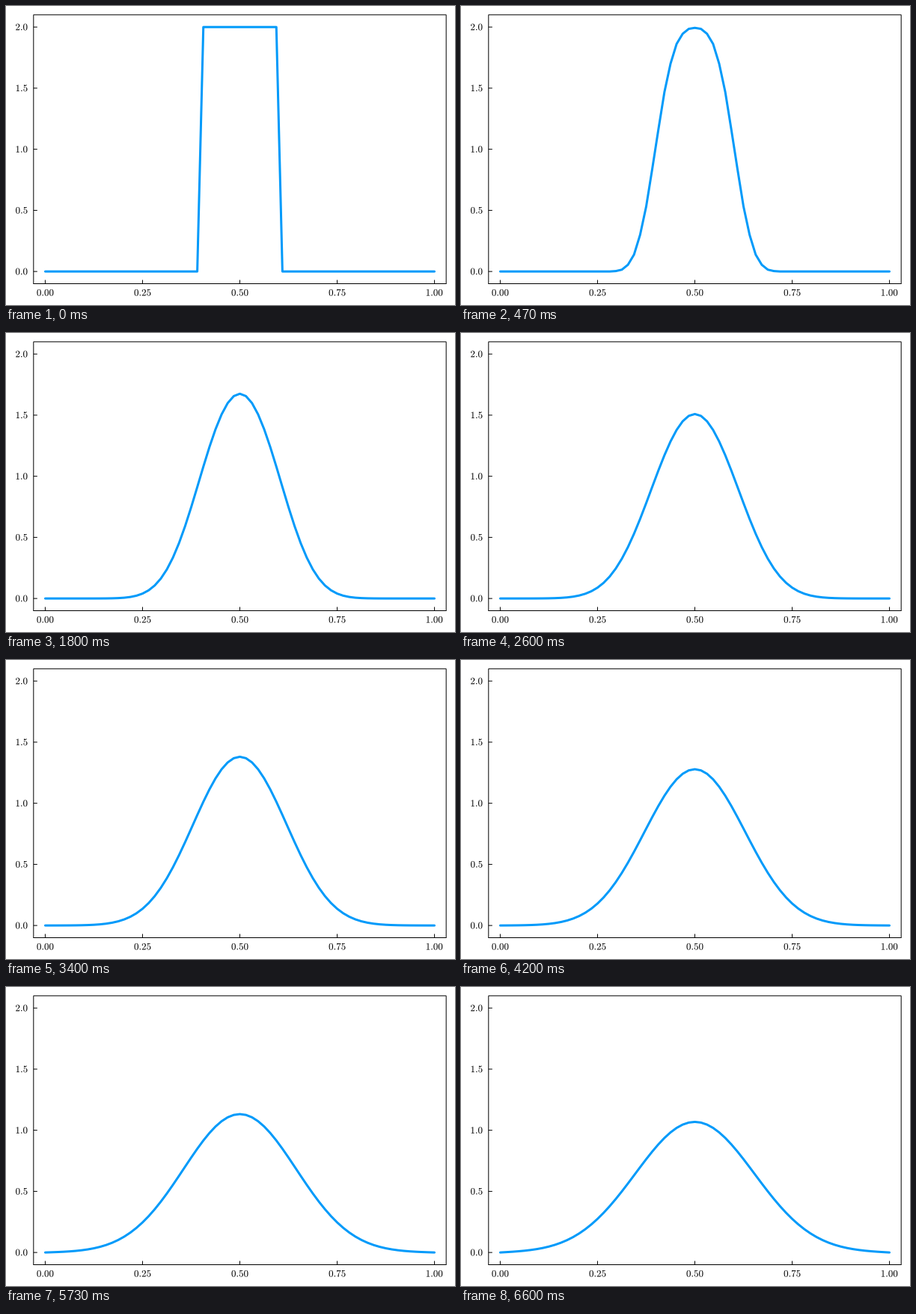
A matplotlib script for the animation above (6670 ms loop, 600 by 400 pixels).

```python
import matplotlib.pyplot as plt
import numpy as np
from matplotlib.animation import FuncAnimation
from matplotlib.patches import PathPatch
from matplotlib.textpath import TextPath

W, H, DPI = 600, 400, 100
PX = 72 / DPI                      # one pixel in points
MARGIN = 3 / 25.4 * DPI            # 3 mm at the top and right
LEFT, RIGHT = 36.8, W - MARGIN
BOTTOM, TOP = H - 371.5, H - MARGIN
CELLS, RATE = 64, 0.4              # grid cells, dt / dx^2
STEPS, FPS = 100, 15
TICK_MS, LOOP_MS = 23, 6670

plt.rcParams["mathtext.fontset"] = "cm"
plt.rcParams["path.snap"] = False


def to_x(v):
    return LEFT + (v + 0.03) / 1.06 * (RIGHT - LEFT)


def to_y(v):
    return BOTTOM + (v + 0.1) / 2.2 * (TOP - BOTTOM)


def diffuse(u):
    """One explicit heat-equation step with the ends held at zero."""
    v = u.copy()
    v[1:-1] += RATE * (u[2:] - 2 * u[1:-1] + u[:-2])
    return v


x = np.linspace(0, 1, CELLS + 1)
states = [np.where(np.abs(x - 0.5) < 0.1, 2.0, 0.0)]
while len(states) < STEPS:
    states.append(diffuse(states[-1]))

# Step times fall on whole hundredths of a second.
starts = np.round(np.arange(STEPS) * 1000 / FPS, -1)

fig = plt.figure(figsize=(W / DPI, H / DPI), dpi=DPI, facecolor="white")
ax = fig.add_axes([0, 0, 1, 1])
ax.set_xlim(0, W)
ax.set_ylim(0, H)
ax.axis("off")


def stroke(xs, ys):
    ax.plot(xs, ys, color="black", lw=PX, solid_capstyle="butt",
            solid_joinstyle="miter")


def label(px, baseline, text, align):
    """Place text by its ink: align 0.5 centres it, 1 ends it at px."""
    path = TextPath((0, 0), f"${text}$", size=13)
    box = path.get_extents()
    shift = (px - box.x0 - align * box.width, baseline)
    ax.add_patch(PathPatch(path.transformed(
        plt.matplotlib.transforms.Affine2D().translate(*shift)),
        facecolor="black", linewidth=0))


stroke([LEFT, RIGHT, RIGHT, LEFT, LEFT, RIGHT],
       [BOTTOM, BOTTOM, TOP, TOP, BOTTOM, BOTTOM])
for v in np.linspace(0, 1, 5):
    stroke([to_x(v)] * 2, [BOTTOM, BOTTOM + 5])
    label(to_x(v), H - 387.6, f"{v:.2f}", 0.5)
for v in np.linspace(0, 2, 5):
    stroke([LEFT, LEFT + 5], [to_y(v)] * 2)
    label(28.5, to_y(v) - 4.2, f"{v:.1f}", 1)

curve, = ax.plot(to_x(x), to_y(states[0]), color="#009afa", lw=3 * PX,
                 solid_capstyle="round", solid_joinstyle="round")


def update(i):
    """Show the last step that begins within this tick."""
    step = np.searchsorted(starts, (i + 1) * TICK_MS) - 1
    curve.set_ydata(to_y(states[step]))
    return curve,


anim = FuncAnimation(fig, update, frames=LOOP_MS // TICK_MS, interval=TICK_MS,
                     repeat=True, repeat_delay=0)
plt.show()
```
